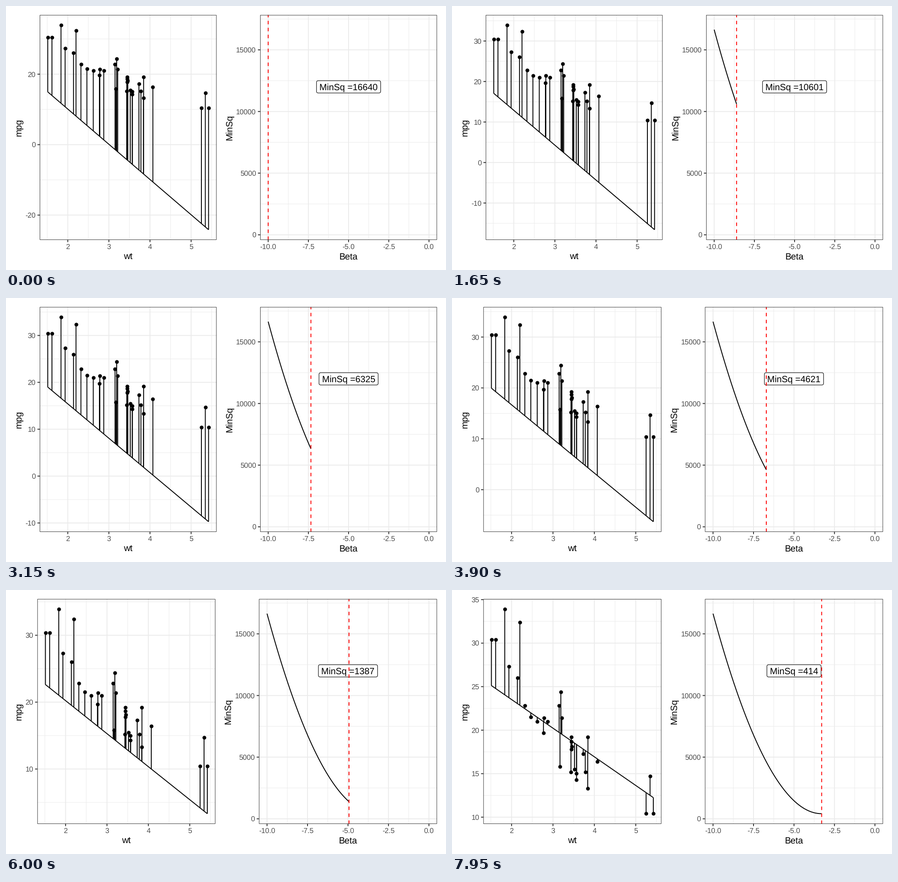
A matplotlib script for the animation above (8000 ms loop, 966x580 px).

```python
import math

import matplotlib.pyplot as plt
import numpy as np
from matplotlib.animation import FuncAnimation
from matplotlib.patches import FancyBboxPatch, Rectangle

plt.rcParams.update({
    "font.family": "Liberation Sans",
    "path.snap": False,
    "text.hinting": "none",
    "lines.solid_capstyle": "butt",
})

WIDTH, HEIGHT, DPI = 966, 580, 100
PX = 72 / DPI                      # points per pixel
TOP, BOTTOM, RIGHT = 19.7, 513.9, 946.3
THICK, THIN = 1.91, 0.96
TICK, TICK_GAP = 4.92, 8.86
TEXT, TITLE = 15.74, 19.72
GRID, FRAME, GREY = "#ebebeb", "#333333", "#4d4d4d"

weight = np.array([
    2.62, 2.875, 2.32, 3.215, 3.44, 3.46, 3.57, 3.19, 3.15, 3.44, 3.44,
    4.07, 3.73, 3.78, 5.25, 5.424, 5.345, 2.2, 1.615, 1.835, 2.465, 3.52,
    3.435, 3.84, 3.845, 1.935, 2.14, 1.513, 3.17, 2.77, 3.57, 2.78])
mileage = np.array([
    21, 21, 22.8, 21.4, 18.7, 18.1, 14.3, 24.4, 22.8, 19.2, 17.8,
    16.4, 17.3, 15.2, 10.4, 10.4, 14.7, 32.4, 30.4, 33.9, 21.5, 15.5,
    15.2, 13.3, 19.2, 27.3, 26, 30.4, 15.8, 19.7, 15, 21.4])

INTERCEPT = 30.1
betas = np.linspace(-10, 0, 80)
errors = np.array([((mileage - INTERCEPT - b * weight) ** 2).sum() for b in betas])

fig = plt.figure(figsize=(WIDTH / DPI, HEIGHT / DPI), dpi=DPI, facecolor="white")
ax = fig.add_axes([0, 0, 1, 1])


def expand(low, high):
    pad = 0.05 * (high - low)
    return low - pad, high + pad


def breaks(limits, step, shift=0.0):
    """Multiples of step inside the limits, moved by a fraction of a step."""
    first = math.ceil(limits[0] / step - shift)
    last = math.floor(limits[1] / step - shift)
    return [(n + shift) * step for n in range(first, last + 1)]


def write(x, y, text, size, color="black", **kw):
    ax.text(x, y, text, fontsize=size * PX, color=color, va="baseline", **kw)


class Panel:
    def __init__(self, left, right, xlim, ylim):
        self.left, self.right, self.xlim, self.ylim = left, right, xlim, ylim

    def x(self, value):
        low, high = self.xlim
        return self.left + (np.asarray(value) - low) / (high - low) * (self.right - self.left)

    def y(self, value):
        low, high = self.ylim
        return BOTTOM - (np.asarray(value) - low) / (high - low) * (BOTTOM - TOP)

    def draw_axes(self, xstep, ystep, xformat, xtitle, ytitle, title_x):
        for shift, width in ((0.5, THIN), (0, THICK)):
            style = dict(colors=GRID, linewidths=width * PX, zorder=0)
            ax.hlines(self.y(breaks(self.ylim, ystep, shift)), self.left, self.right, **style)
            ax.vlines(self.x(breaks(self.xlim, xstep, shift)), TOP, BOTTOM, **style)

        ticks = dict(colors=FRAME, linewidths=THICK * PX)
        for value in breaks(self.xlim, xstep):
            x = self.x(value)
            ax.vlines(x, BOTTOM, BOTTOM + TICK, **ticks)
            write(x, 534, format(value, xformat), TEXT, GREY, ha="center")
        for value in breaks(self.ylim, ystep):
            y = self.y(value)
            ax.hlines(y, self.left - TICK, self.left, **ticks)
            write(self.left - TICK_GAP, y + 0.355 * TEXT, f"{value:.0f}", TEXT, GREY, ha="right")

        write((self.left + self.right) / 2, 556.6, xtitle, TITLE, ha="center")
        write(title_x, (TOP + BOTTOM) / 2, ytitle, TITLE, ha="center",
              rotation=90, rotation_mode="anchor")
        half = THIN / 2
        ax.add_patch(Rectangle(
            (self.left + half, TOP + half), self.right - self.left - THIN,
            BOTTOM - TOP - THIN, fill=False, ec=FRAME, lw=THIN * PX, zorder=6))


def draw_label(x, y, value):
    digits = str(value)
    width, height = 85.9 + 10.99 * len(digits), 27
    radius = 3.86
    ax.add_patch(FancyBboxPatch(
        (x - width / 2, y - height / 2), width, height,
        boxstyle=f"round,pad=0,rounding_size={radius}",
        fc="white", ec="black", lw=1.1 * PX, zorder=3))
    write(x, y + 7.05, f"MinSq ={digits}", 19.76, ha="center", zorder=4)


def update(frame):
    step = frame // 3
    ax.clear()
    ax.set(xlim=(0, WIDTH), ylim=(HEIGHT, 0))
    ax.axis("off")
    line_width = THICK * PX

    beta = betas[step]
    fitted = INTERCEPT + beta * weight
    ylim = expand(min(fitted.min(), mileage.min()), mileage.max())
    ystep = 20 if step < 9 else 10 if step < 45 else 5

    # Without a minus sign in the labels both panels share the freed space.
    freed = 0 if breaks(ylim, ystep)[0] < 0 else 5.24
    left = 74.0 - freed
    size = 388.35 + freed / 2

    scatter = Panel(left, left + size, expand(weight.min(), weight.max()), ylim)
    scatter.draw_axes(1, ystep, ".0f", "wt", "mpg", 33.7)
    x = scatter.x(weight)
    ax.vlines(x, scatter.y(mileage), scatter.y(fitted), colors="black", linewidths=line_width)
    ends = np.array([weight.min(), weight.max()])
    ax.plot(scatter.x(ends), scatter.y(INTERCEPT + beta * ends), color="black", lw=line_width)
    ax.plot(x, scatter.y(mileage), "o", color="black", ms=8.3 * PX, mew=0)

    loss = Panel(RIGHT - size, RIGHT, expand(-10, 0), expand(errors.min(), 17000))
    loss.draw_axes(2.5, 5000, ".1f", "Beta", "MinSq", scatter.right + 33.7)
    if step:
        ax.plot(loss.x(betas[:step + 1]), loss.y(errors[:step + 1]), color="black", lw=line_width)
    draw_label(loss.x(-5), loss.y(12000), round(errors[step]))
    ax.plot([loss.x(beta)] * 2, [BOTTOM, TOP], color="red", lw=line_width,
            ls=(0, (4, 4)), dash_capstyle="butt", zorder=5)
    return []


animation = FuncAnimation(fig, update, frames=160, interval=50, repeat=True, repeat_delay=0)
plt.show()
```
